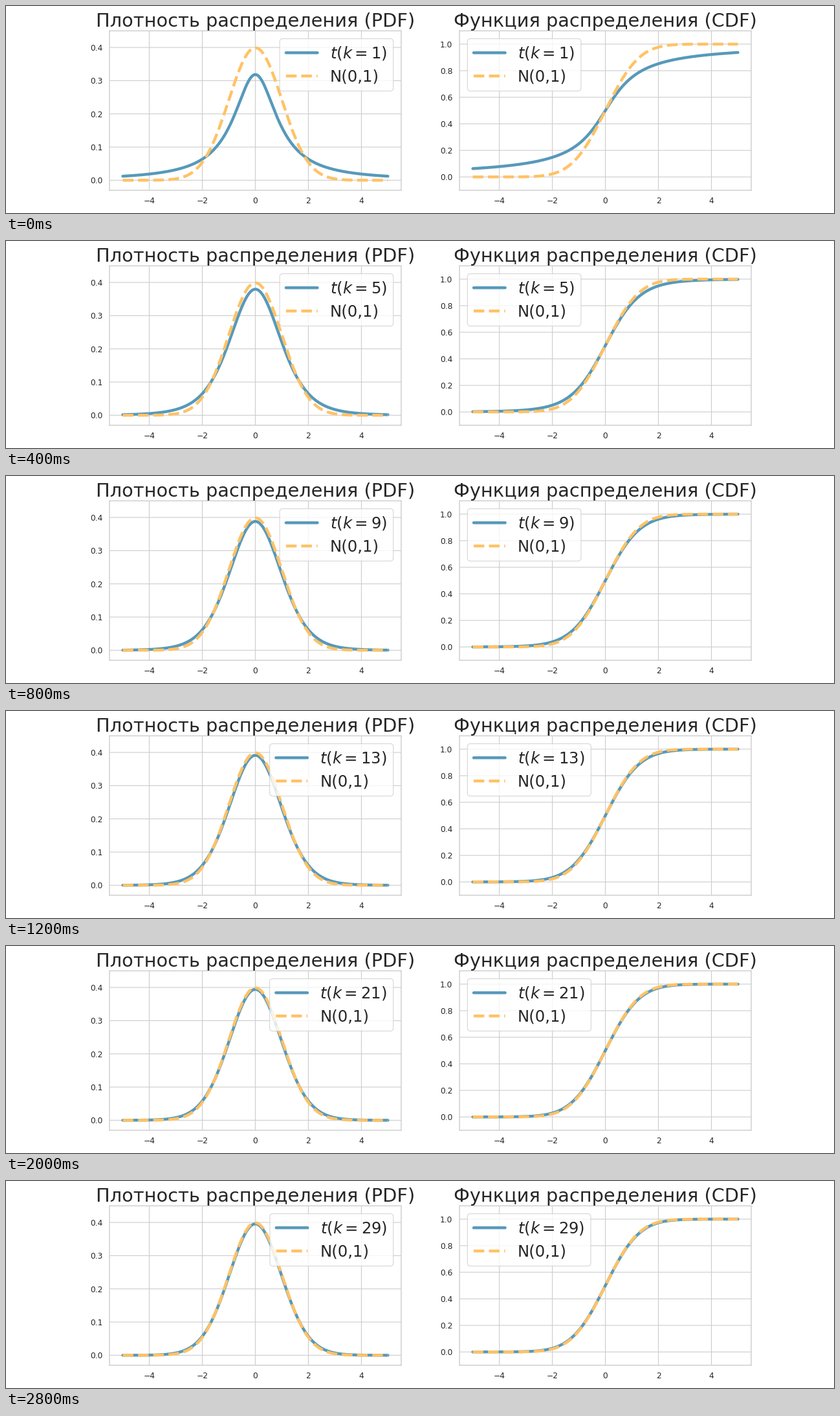
A matplotlib script that plays this animation: 1280x320 px, repeating every 2900 ms.

```python
import math

import numpy as np
import matplotlib.pyplot as plt
from matplotlib.animation import FuncAnimation

FRAMES, INTERVAL = 29, 100
BLUE, ORANGE = "#5799ba", "#ffc266"
INK, PALE = "0.15", "0.8"

plt.rcParams.update({
    "font.family": "DejaVu Sans",
    "text.color": INK,
    "path.snap": False,
    "axes.edgecolor": PALE,
    "axes.linewidth": 1.25,
    "axes.axisbelow": True,
    "axes.grid": True,
    "axes.titlesize": 25.9,
    "grid.color": PALE,
    "grid.linewidth": 1,
    "xtick.bottom": False,
    "ytick.left": False,
    "xtick.color": INK,
    "ytick.color": INK,
    "xtick.labelsize": 11,
    "ytick.labelsize": 11,
    "xtick.major.size": 6,
    "ytick.major.size": 6,
    "lines.linewidth": 4,
    "lines.solid_capstyle": "round",
    "legend.fontsize": 21.9,
    "legend.labelspacing": 0.47,
})

x = np.linspace(-5, 5, 1001)


def normal_pdf():
    return np.exp(-x**2 / 2) / math.sqrt(2 * math.pi)


def student_pdf(k):
    log_c = math.lgamma((k + 1) / 2) - math.lgamma(k / 2)
    return math.exp(log_c) / math.sqrt(k * math.pi) * (1 + x**2 / k) ** (-(k + 1) / 2)


def to_cdf(pdf):
    """Integrate a symmetric density so that the value at zero is one half."""
    steps = (pdf[1:] + pdf[:-1]) / 2 * np.diff(x)
    total = np.concatenate(([0], np.cumsum(steps)))
    return total - total[len(x) // 2] + 0.5


def make_panel(ax, title, normal, ylim, yticks):
    ax.set_title(title)
    student, = ax.plot(x, normal, color=BLUE)
    ax.plot(x, normal, "--", color=ORANGE, label="N(0,1)")
    ax.set(xlim=(-5.5, 5.5), ylim=ylim, xticks=range(-4, 5, 2), yticks=yticks)
    return student


fig, (left, right) = plt.subplots(1, 2, figsize=(16, 4), dpi=80)
normal = normal_pdf()
pdf_line = make_panel(left, "Плотность распределения (PDF)", normal,
                      (-0.03, 0.45), np.linspace(0, 0.4, 5))
cdf_line = make_panel(right, "Функция распределения (CDF)", to_cdf(normal),
                      (-0.1, 1.1), np.linspace(0, 1, 6))


def update(frame):
    k = frame + 1
    pdf = student_pdf(k)
    pdf_line.set_ydata(pdf)
    cdf_line.set_ydata(to_cdf(pdf))
    for line, loc in ((pdf_line, "upper right"), (cdf_line, "upper left")):
        line.set_label(f"$t(k={k})$")
        line.axes.legend(loc=loc)
    return pdf_line, cdf_line


anim = FuncAnimation(fig, update, frames=FRAMES, interval=INTERVAL,
                     repeat=True, repeat_delay=0)
plt.show()
```
